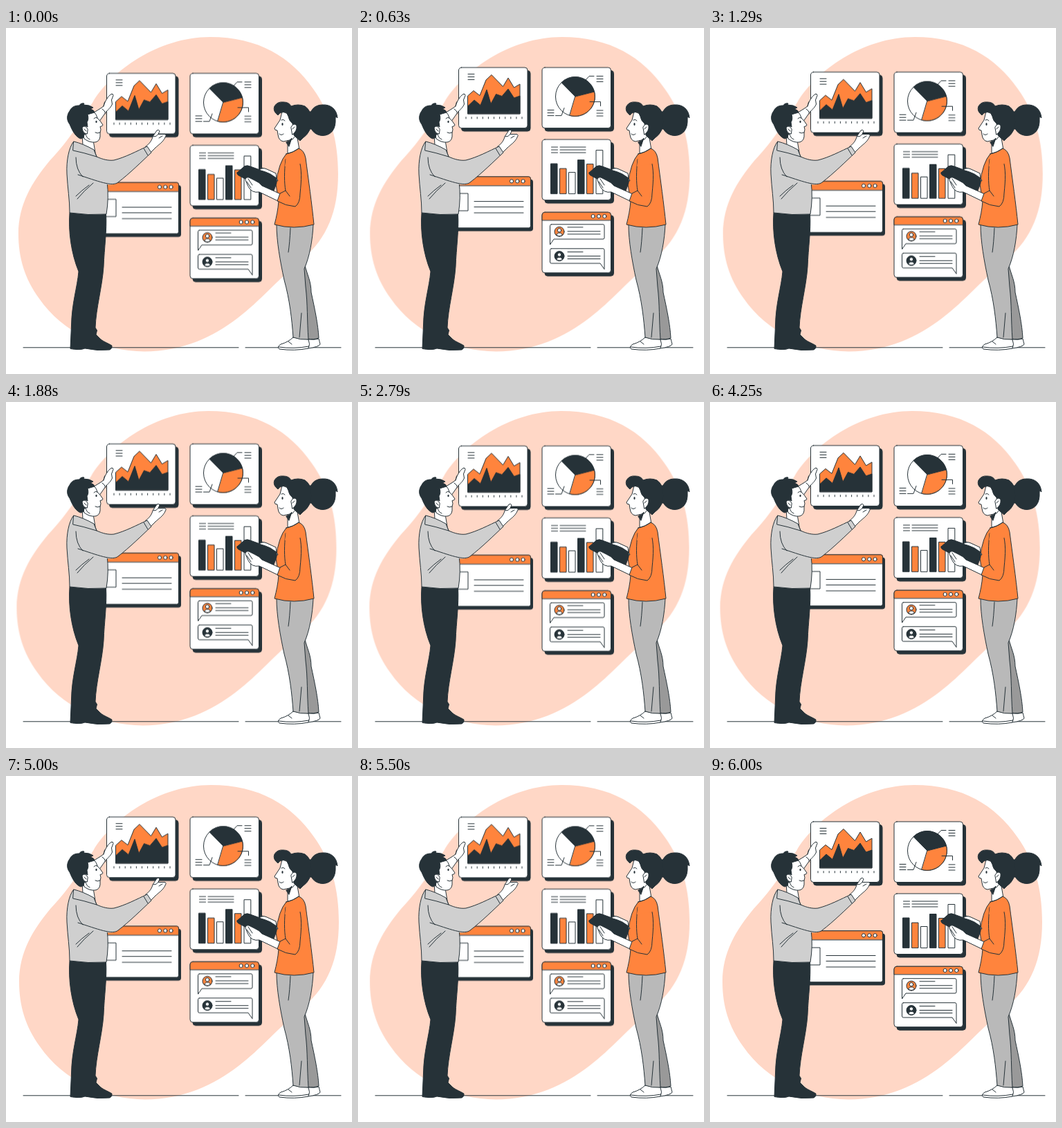
Animation of 500x500 px, one loop 6040 ms. Source, as an HTML page without scripts:

```html
<!DOCTYPE html>
<html lang="en">
<head>
<meta charset="utf-8">
<title>Team dashboard</title>
<style>
  html, body { margin: 0; width: 100%; height: 100%; overflow: hidden; background: #fff; }
  svg { display: block; width: 100%; height: 100%; }
  .art { stroke: #263238; stroke-width: 1; stroke-linejoin: round; stroke-linecap: round; fill: none; }
  .dark { fill: #263238; }
  .orange { fill: #ff843d; }
  .white { fill: #fff; }
  .shirt { fill: #cfcfcf; }
  .leg { fill: #b9b9b9; }
  .back-leg { fill: #999; }
  .blob { fill: #ffd7c6; animation: sway 6.04s linear -.04s infinite; }
  .panels { animation: float 1.51s linear -.04s infinite; }
  @keyframes float {
    0%, 100% { transform: translateY(0); }
    50% { transform: translateY(-10px); }
  }
  @keyframes sway {
    0%, 100% { transform: translateX(0); }
    10%, 90% { transform: translateX(-1px); }
    20%, 80% { transform: translateX(2px); }
    30%, 50%, 70% { transform: translateX(-4px); }
    40%, 60% { transform: translateX(4px); }
  }
</style>
</head>
<body>
<svg viewBox="0 0 500 500">
  <defs>
    <g id="card">
      <rect class="dark" x="4" y="4.5" width="99.5" height="87.5" rx="4"/>
      <rect class="white" width="99.5" height="87.5" rx="4"/>
    </g>
    <path id="note" d="M0 0h9M0 4h9M0 8h9"/>
    <g id="dots" class="white">
      <circle r="2.6"/><circle cx="8.3" r="2.6"/><circle cx="16.6" r="2.6"/>
    </g>
    <g id="avatar">
      <circle r="7"/>
      <g class="white">
        <path d="M-4.3 5.2C-4 .6 4 .6 4.3 5.2Q0 8 -4.3 5.2Z"/>
        <circle cy="-2" r="2.7"/>
      </g>
    </g>
    <path id="message" d="M0 0h22M0 6h47M0 10h47"/>
  </defs>

  <path class="blob" d="M295 13C365 13 412 42 444 88C470 124 480 165 480 211C480 265 464 303 430 333C390 366 368 394 335 419C300 446 255 467.500 200 467.500C140 467 82 440 48 391C27 362 18 332 18 297C18 255 38 222 63 192C95 158 106 136 125 108C152 62 220 13 295 13Z"/>

  <g class="art">
    <path d="M25 461.800H336M346 461.800H484"/>

    <g class="panels">
      <!-- area chart -->
      <use href="#card" x="145.500" y="66"/>
      <use href="#note" x="159" y="75.500"/>
      <path class="orange" d="M158.500 132.500V107L167 99.500L176 106.500L185 84L193 76.500L209.500 93.500L217 81L225.500 95L234 90V132.500Z"/>
      <path class="dark" d="M158.500 132.500V122L168 113L177 120.500L186 98L192 118.500L199.500 104.500L208 107.500L217 97L225.500 110L234 107V132.500Z"/>
      <path stroke-width="3" stroke-linecap="butt" stroke-dasharray="1 7.100" d="M155.500 138.700H238"/>

      <!-- pie chart -->
      <use href="#card" x="266" y="66"/>
      <circle class="white" cx="314" cy="108" r="28.500"/>
      <path class="dark" d="M314 108L294 87.700A28.500 28.500 0 0 1 341.500 101Z"/>
      <path class="orange" d="M314 108L341.500 101A28.500 28.500 0 0 1 306 135.300Z"/>
      <path d="M329 84L334 78.500H341M335 115.500H350.500V121.500M298 124.500L294 135.500H285.500"/>
      <use href="#note" x="345" y="78.500"/>
      <use href="#note" x="345" y="128"/>
      <use href="#note" x="274" y="127.500"/>

      <!-- bar chart -->
      <use href="#card" x="266" y="170"/>
      <use href="#note" x="279.500" y="181"/>
      <path d="M292 181h37m-37 4h37m-37 4h37"/>
      <path class="dark" d="M278.500 248V205h9.500v43ZM317.500 248V199.500h9.500v48.500Z"/>
      <path class="orange" d="M291.500 248V212h9.500v36ZM330.500 248V205.500h9.500v42.500Z"/>
      <path class="white" d="M304.500 248V217.500h9.500v30.500ZM344 248V185.500h9.800v62.500Z"/>

      <!-- chat -->
      <use href="#card" x="266" y="275.200"/>
      <path class="orange" d="M266 286.500V279.200a4 4 0 0 1 4-4H361.500a4 4 0 0 1 4 4V286.500Z"/>
      <use href="#dots" x="339.700" y="281"/>
      <path class="white" d="M279.500 292.700H354a2 2 0 0 1 2 2V312a2 2 0 0 1-2 2H283L277.500 322V294.700a2 2 0 0 1 2-2Z"/>
      <path class="white" d="M279.500 327.700H354a2 2 0 0 1 2 2V357.500L350 349H279.500a2 2 0 0 1-2-2V329.700a2 2 0 0 1 2-2Z"/>
      <use href="#avatar" class="orange" x="291" y="303.200"/>
      <use href="#avatar" class="dark" x="291" y="338.500"/>
      <use href="#message" x="303" y="296.800"/>
      <use href="#message" x="303" y="332.500"/>

      <!-- web page -->
      <rect class="dark" x="114" y="228" width="138.500" height="74" rx="3"/>
      <rect class="white" x="110" y="223.800" width="139.500" height="74" rx="3"/>
      <path class="orange" d="M110 236.500V223.800H246.500a3 3 0 0 1 3 3V236.500Z"/>
      <use href="#dots" x="222" y="230.300"/>
      <path d="M130 248H159V273H130M168 259.500h71m-71 8h71m-71 8.500h71"/>
    </g>

    <!-- man -->
    <path class="white" d="M124 124C130 120 136 117 141 113C143 106 147 99 152 95.500Q155 94.500 155 97.500L152.500 104L153.500 110C151 116 147 118 144 122L132 139Z"/>
    <path d="M141 113L142.500 107M139 117Q143 119 144 124"/>
    <path class="dark" d="M92 267C90 294 94 325 105 352C103 375 95 398 94.500 430L93 463.500Q107 466 114 463Q132 467 150 465Q154 463 153 459C147 455 139 453 134 447L130 443L131.500 437L129 433C130 405 139 374 141 345C142 317 146 292 144.500 269Z"/>
    <path class="shirt" d="M97 165C91 173 87 191 88 211C89 231 92 248 92 267Q119 271 145 269Q149 245 146 222L141 199L131 186L128 178Z"/>
    <path class="white" d="M202 171C207 168 211 162 212 157L218 148Q221 146 222 149L220 153.500L230 153.500Q232.500 155 230 158C227 165 220 169 216 173L208 181Z"/>
    <path d="M213 157Q217 158 220 153.500M221 159L226 156"/>
    <path class="shirt" stroke="none" d="M110 183L131 186C140 190 148 192 156 191C172 187 189 178 204 171L210 180C196 193 179 210 162 223Q155 228 146 226L104 212Z"/>
    <path d="M131 186C140 190 148 192 156 191C172 187 189 178 204 171L210 180C196 193 179 210 162 223C154 230 132 221 104 212M101 187Q101 205 111 215M199 174L205 184M126 224Q112 236 103 247M120 227Q109 235 101 243"/>
    <path class="white" d="M110 153L111 169L129 180L126 162Z"/>
    <path class="white" d="M113 121L127 121Q131 125 132 130Q137 135 140 140Q140 142 136 142.500Q138 147 136 151L136 157Q135 164 129 165Q121 166 113 160L108 139Z"/>
    <path class="dark" d="M108 160C101 158 96 149 92 139C87 133 88 125 92 120C95 113 101 112 106 112Q108 108 113 109L112 111Q121 111 126 115L122 117Q128 119 128 122Q121 124 118 125Q120 132 117 136L118 143Q112 139 110 145Q111 151 115 153Q112 154 112 158Z"/>
    <path class="white" d="M118 146Q114 139 110 144Q111 153 117 153Z"/>
    <path d="M113 146L116 149M127 131Q129 128 132 130M136 151Q132 153 129 151M115 153Q116 159 121 161"/>
    <ellipse class="dark" stroke="none" cx="130.500" cy="135.500" rx="1.100" ry="1.800"/>
    <path class="shirt" d="M98 164Q111 167 127 176L131 186Q112 180 97 177Z"/>

    <!-- woman -->
    <path class="white" d="M438 450Q446 451 452 449L454 457Q452 461 436 463L430 459Z"/>
    <path class="white" d="M415 447L437 450Q440 457 437 463Q417 467 395 464Q391 461 397 457Q408 454 415 447Z"/>
    <path d="M394 461Q416 464 438 460M408 453L413 457"/>
    <path class="back-leg" d="M424 330L432 343C435 356 441 366 441 382C446 405 451 428 452 448Q445 451 435 449Z"/>
    <path class="leg" d="M391 284C391 308 396 336 402 364C410 393 413 420 415 447Q425 451 437 450C435 422 436 398 433 374L431 348C439 330 443 306 444 284Z"/>
    <path d="M411 289Q410 311 408 324M427 412L424 447"/>
    <path class="white" d="M407 158L407 181Q414 187 424 176L420 153Z"/>
    <path class="orange" d="M405 182Q415 180 423 174Q431 177 433 188C437 219 442 254 445 284Q416 292 388 284C391 272 393 263 394 250L390 226Q394 194 405 182Z"/>
    <path class="white" d="M363 207L370 202L380 206L389 212L393 221L380 220Z"/>
    <path class="dark" d="M334 209L345 199.500Q349 198 353 200L389 213Q392 217 391 224L387 235L376 234L338 214Q333 212 334 209Z"/>
    <path class="white" d="M366 205Q371 201 377 204L390 210L391 217L382 211L375 208Z"/>
    <path class="white" d="M346 219Q347 215 351 216L359 220Q366 223 370 228L397 240L393 250L366 237Q355 239 350 229Z"/>
    <path d="M350 218L356 227M348 222L354 231"/>
    <path class="orange" d="M404 190C402 207 402 224 404 235L396 239L392 250Q404 257 418 258Q425 253 425 239C427 219 428 205 423 188Z"/>
    <path class="orange" stroke="none" d="M405 184L423 178L426 196L403 200Z"/>
    <path d="M404 235L410 243M405 182Q415 180 423 174"/>
    <path class="dark" d="M438 133C438 119 446 111 457 111C470 110 478 118 479 130Q476 127 476 131C477 146 470 155 458 155.500C446 155.500 438 146 438 133Z"/>
    <path class="dark" d="M437 121L444 121V146L438 146Z"/>
    <path class="white" d="M399 121L396 133L388 145Q388 148 392 148L393 154Q394 163 401 164L414 161Q427 149 419 129Z"/>
    <path class="dark" d="M405 122Q397 120 393 126Q385 120 388 113Q392 106 401 107Q409 107 412 113Q422 109 432 113Q441 119 441 133Q442 150 429 159L425 163Q420 159 416 155L414 138Q409 134 408 128Z"/>
    <path class="dark" d="M405 165Q410 164 413 159L409 171Z"/>
    <path class="white" d="M412 143Q416 136 420 141Q421 149 414 154Z"/>
    <path d="M414 146L417 143M395 153Q398 156 401 153M398 133Q401 131 403 134"/>
    <ellipse class="dark" stroke="none" cx="399.500" cy="139" rx="1.100" ry="1.900"/>
  </g>
</svg>
</body>
</html>
```
